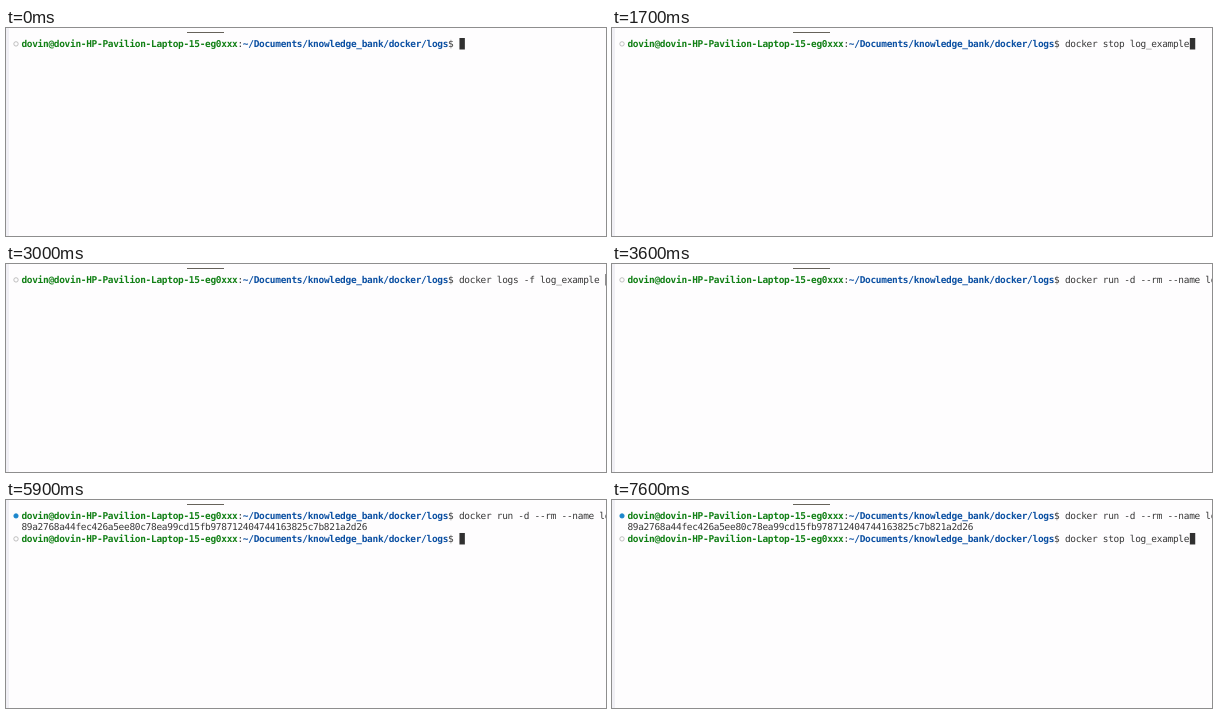
Animation, 600 px wide and 208 px high, one loop 8 s. Source, as an HTML page:

```html
<!DOCTYPE html>
<html lang="en">
<head>
<meta charset="utf-8">
<title>Terminal session</title>
<style>
html, body { margin: 0; width: 100%; height: 100%; overflow: hidden; background: #fefdfe; }
svg { display: block; width: 100%; height: 100%; }
text {
  /* 14px type on an 8 by 17 cell grid, shown at 0.676 */
  font: 9.464px "DejaVu Sans Mono", monospace;
  letter-spacing: -0.29px;
  fill: #383838;
  white-space: pre;
  text-rendering: geometricPrecision;
}
.host { font-weight: bold; fill: #107f14; }
.path { font-weight: bold; fill: #0a4fa2; }
</style>
</head>
<body>
<svg id="stage" viewBox="0 0 600 208">
  <rect width="600" height="208" fill="#fefdfe"/>
  <rect width="3" height="208" fill="#f1f0f5"/>
  <rect x="181" y="4" width="37" height="1" fill="#66625a"/>
</svg>
<script>
const LOOP = 8000, SCALE = 0.676, CELL = 8 * SCALE, ROW = 17 * SCALE;
const LEFT = 15.4, TOP = 10, BASE = 18.9, PROMPT_COLS = 81;
const HOST = "dovin@dovin-HP-Pavilion-Laptop-15-eg0xxx";
const DIR = "~/Documents/knowledge_bank/docker/logs";
const HASH = "89a2768a44fec426a5ee80c78ea99cd15fb978712404744163825c7b821a2d26";
const RUN = "docker run -d --rm --name log_example";
const STOP = "docker stop log_example";
const LOGS = "docker logs -f log_example";

// Recalled commands: [start time, text]
const first = [[0, ""], [1400, "clear"], [1700, STOP], [1900, RUN], [2000, "clear"],
  [2400, LOGS], [3000, LOGS + " "], [3600, RUN]];
const second = [[5900, ""], [6700, RUN], [7200, "clear"], [7600, STOP]];
const ENTER = 5500, OUTPUT = 5600, READY = 5900;

const stage = document.getElementById("stage");

function add(parent, tag, attrs = {}, content = "") {
  const el = document.createElementNS("http://www.w3.org/2000/svg", tag);
  for (const key in attrs) el.setAttribute(key, attrs[key]);
  el.textContent = content;
  return parent.appendChild(el);
}

function line(row) {
  return add(stage, "text", { x: LEFT, y: BASE + row * ROW });
}

function promptLine(row) {
  const text = line(row);
  add(text, "tspan", { class: "host" }, HOST);
  add(text, "tspan", {}, ":");
  add(text, "tspan", { class: "path" }, DIR);
  add(text, "tspan", {}, "$ ");
  const command = add(text, "tspan");
  const dot = add(stage, "circle", { cx: 10, cy: 15.9 + row * ROW, r: 2.2, "stroke-width": 0.8 });
  return { text, command, dot };
}

function setDot(dot, done) {
  dot.setAttribute("fill", done ? "#1b86cc" : "none");
  dot.setAttribute("stroke", done ? "#1b86cc" : "#b0b0b0");
}

function show(el, on) {
  el.setAttribute("visibility", on ? "visible" : "hidden");
}

function commandAt(list, t) {
  let text = "";
  for (const [start, value] of list) if (t >= start) text = value;
  return text;
}

const top1 = promptLine(0);
const output = line(1);
output.textContent = HASH;
const next = promptLine(2);
const cursor = add(stage, "rect", { width: CELL, height: ROW, fill: "#303030" });

function render(t) {
  const ready = t >= READY;
  const a = commandAt(first, t), b = commandAt(second, t);
  top1.command.textContent = a;
  next.command.textContent = b;
  setDot(top1.dot, ready);
  setDot(next.dot, false);
  show(output, t >= OUTPUT);
  show(next.text, ready);
  show(next.dot, ready);

  let row = 0, col = PROMPT_COLS + a.length;
  if (ready) { row = 2; col = PROMPT_COLS + b.length; }
  else if (t >= ENTER) { row = t < OUTPUT ? 1 : 2; col = 0; }
  cursor.setAttribute("x", LEFT + col * CELL);
  cursor.setAttribute("y", TOP + row * ROW);
}

function tick() {
  render(performance.now() % LOOP);
  requestAnimationFrame(tick);
}
tick();
</script>
</body>
</html>
```
